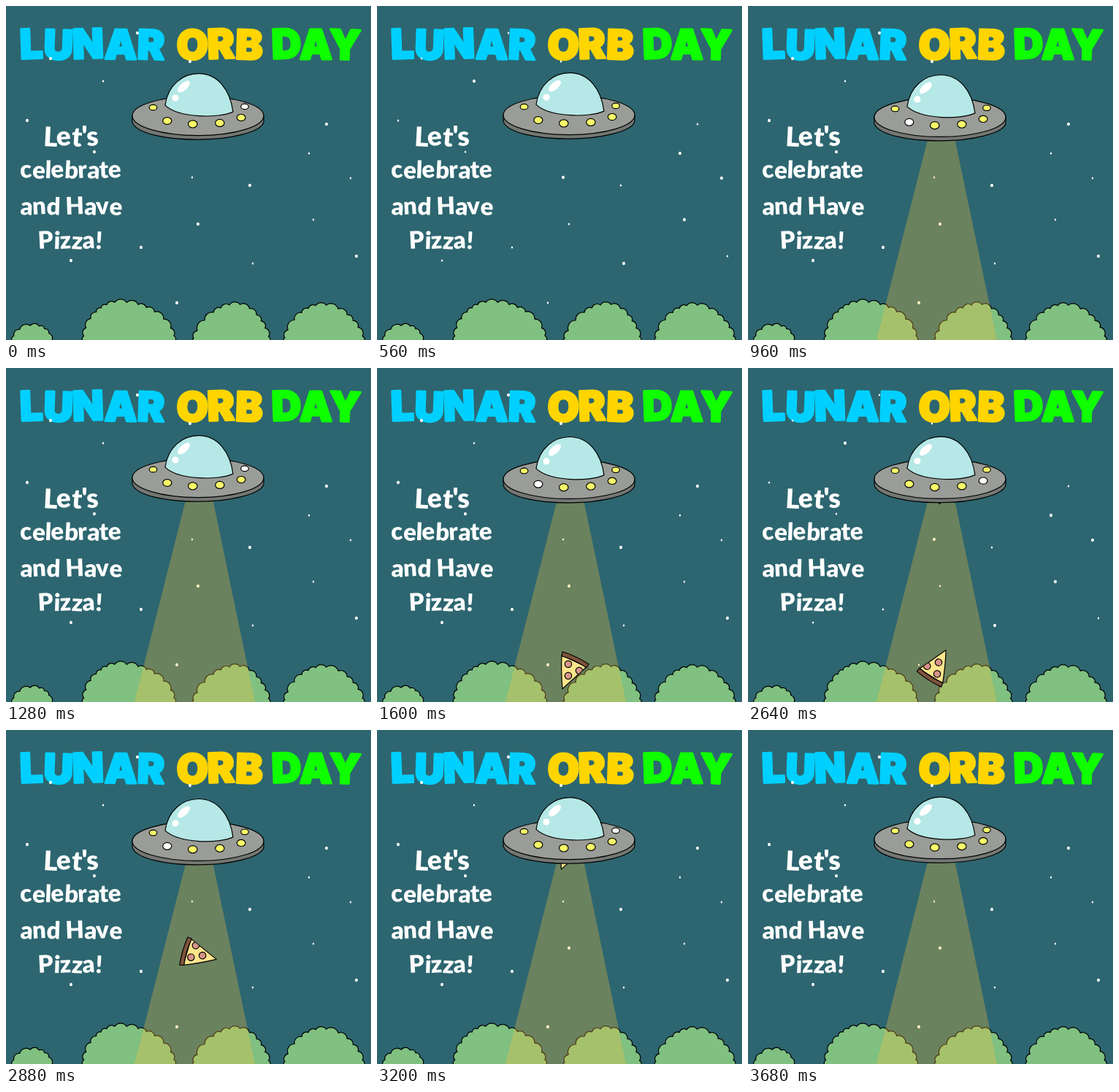
Animation of 500x458 px, one loop 3.84 s. Source, as an HTML page:

```html
<!DOCTYPE html>
<html lang="en">
<head>
<meta charset="utf-8">
<title>Lunar Orb Day</title>
<style>
  html, body { margin: 0; width: 100%; height: 100%; overflow: hidden; background: #2d6670; }
  svg { display: block; width: 500px; height: 458px; }
  text { text-anchor: middle; }
  .title { font: 900 56px Inter, sans-serif; stroke-width: 3; stroke-linejoin: round; }
  .note { font: 900 33px Lato, sans-serif; fill: #fff; }
  .ink { stroke: #000; stroke-width: 1.2; stroke-linejoin: round; }
</style>
</head>
<body>
<svg viewBox="0 0 500 458">
  <rect width="500" height="458" fill="#2d6670"/>
  <g class="title">
    <text x="118" y="72.5" rotate="-2 2 -2 1 2" fill="#00d0ff" stroke="#00d0ff">LUNAR</text>
    <text x="292" y="72.5" rotate="2 -2 2" fill="#ffd500" stroke="#ffd500">ORB</text>
    <text x="425" y="72.5" rotate="-2 0 2" fill="#10ff00" stroke="#10ff00">DAY</text>
  </g>
  <g class="note">
    <text x="89" y="192" rotate="3 -4 4 0 -3" style="font-size:37px">Let's</text>
    <text x="89" y="236" rotate="-4 4 2 -4 3 -3 4 -2 -4">celebrate</text>
    <text x="89" y="286" rotate="3 -3 2 0 -2 3 -3 4">and Have</text>
    <text x="88" y="333" rotate="-3 2 -3 3 -3 3">Pizza!</text>
  </g>
  <g id="bushes" class="ink" fill="#80c080"></g>
  <g id="stars" fill="#fff"></g>
  <path id="beam" fill="#fbc338" fill-opacity=".3"/>
  <defs>
    <clipPath id="cheese"><path d="M-14-18L19-3L-13 27Z"/></clipPath>
    <g id="slice" class="ink">
      <path d="M-14-19L20-3L-13 27Q-15 5-14-19Z" fill="#fde58c"/>
      <g clip-path="url(#cheese)" fill="#d8938a">
        <circle cx="-5" cy="-7" r="4.7"/><circle cx="10" cy="2" r="4.7"/><circle cx="-5" cy="9" r="4.7"/>
      </g>
      <path d="M-13-24Q6-18 23-7L20-2Q4-13-14-18Z" fill="#80533c"/>
    </g>
  </defs>
  <use id="first" href="#slice"/>
  <use id="second" href="#slice"/>
  <g id="ufo" class="ink">
    <path d="M173 151V160C178 176 220 184 263 184S350 174 353 160V151Z" fill="#747773"/>
    <ellipse cx="263" cy="151.5" rx="90" ry="27" fill="#9a9c97"/>
    <path d="M218 137C222 109 242 93.6 264 93.6C290 93.6 307 116 311 146C292 155 237 155 218 137Z" fill="#b5e8e6"/>
    <g fill="#fff" stroke="none">
      <ellipse cx="243.5" cy="111.5" rx="10.5" ry="5" transform="rotate(-42 243.5 111.5)"/>
      <circle cx="232" cy="127" r="4.6"/>
    </g>
    <g id="lights"></g>
  </g>
</svg>
<script>
const STEP = 80, LOOP = 3840, GROUND = 460;
const byId = id => document.getElementById(id);

function add(parent, tag, attrs) {
  const node = document.createElementNS('http://www.w3.org/2000/svg', tag);
  for (const key in attrs) node.setAttribute(key, attrs[key]);
  return byId(parent).appendChild(node);
}

// A leaning dome edged with outward arcs; a higher power gives steeper shoulders.
function addBush(left, peak, right, top, bumps, power) {
  let d = `M${left} ${GROUND}`, px = left, py = GROUND;
  for (let i = 1; i <= bumps; i++) {
    const wobble = i < bumps ? 0.2 * Math.sin(i * 5) : 0;
    const angle = Math.PI * (1 - (i + wobble) / bumps);
    const c = Math.cos(angle);
    const x = peak + c * (c < 0 ? peak - left : right - peak);
    const y = GROUND - (GROUND - top) * Math.max(0, Math.sin(angle)) ** power;
    const r = 0.6 * Math.hypot(x - px, y - py);
    d += `A${r} ${r} 0 0 1 ${x} ${y}`;
    px = x;
    py = y;
  }
  add('bushes', 'path', { d });
}
addBush(9, 38, 62, 438, 7, 1);
addBush(106, 155, 231, 406, 15, 1.1);
addBush(256, 316, 361, 409, 13, 1.5);
addBush(381, 433, 490, 410, 13, 1.4);

// Every third star twinkles out of step with the others.
const stars = [
  [133, 103], [180, 37], [61, 72], [415, 202], [252, 76], [29, 157],
  [472, 236], [121, 200], [439, 162], [255, 235], [334, 246], [263, 299],
  [421, 293], [480, 343], [185, 331], [338, 353], [89, 349], [234, 407]
].map(([cx, cy]) => add('stars', 'ellipse', { cx, cy }));

// Lamps sit around the rim and look larger towards the front.
const lights = [196, 132, 98, 65, 30, -20].map(degrees => {
  const angle = degrees * Math.PI / 180, front = Math.sin(angle);
  return add('lights', 'ellipse', {
    cx: 265 + 66 * Math.cos(angle), cy: 145 + 18 * front, rx: 5.5 + 0.7 * front, ry: 4.1 + front
  });
});

const progress = (t, from, to) => Math.min(1, Math.max(0, (t - from) / (to - from)));

function placeSlice(id, x, y, angle) {
  const node = byId(id);
  node.setAttribute('visibility', y > 145 && y < 490 ? 'visible' : 'hidden');
  node.setAttribute('transform', `translate(${x} ${y}) rotate(${angle})`);
}

function render(time) {
  const step = Math.min(46, Math.floor(time % LOOP / STEP));
  const t = step * STEP;

  const bob = 2 * Math.sin((step - 0.6) * Math.PI / 4);
  byId('ufo').setAttribute('transform', `translate(0 ${bob})`);
  lights.forEach((node, i) => node.setAttribute('fill', i === 5 - step % 8 ? '#fff' : '#f8fa6a'));

  stars.forEach((node, i) => {
    const large = (step % 2 === 1) === (i % 3 === 0);
    node.setAttribute('rx', large ? 2 : 1.2);
    node.setAttribute('ry', large ? 2.3 : 1.5);
  });

  byId('beam').setAttribute('d', t < 720 ? '' : `M248 ${175 + bob}H282L341 458H176Z`);

  placeSlice('first', 267 + 8 * progress(t, 2080, 2640), 413 - (t - 1600) * 0.24375, 0);
  const rise = progress(t, 2640, 3200);
  placeSlice('second', 255 + 10.5 * rise, 412 - (t - 2640) * 0.443, 187 + 173 * rise);
}

const start = performance.now();
function tick() {
  render(performance.now() - start);
  requestAnimationFrame(tick);
}
tick();
</script>
</body>
</html>
```
